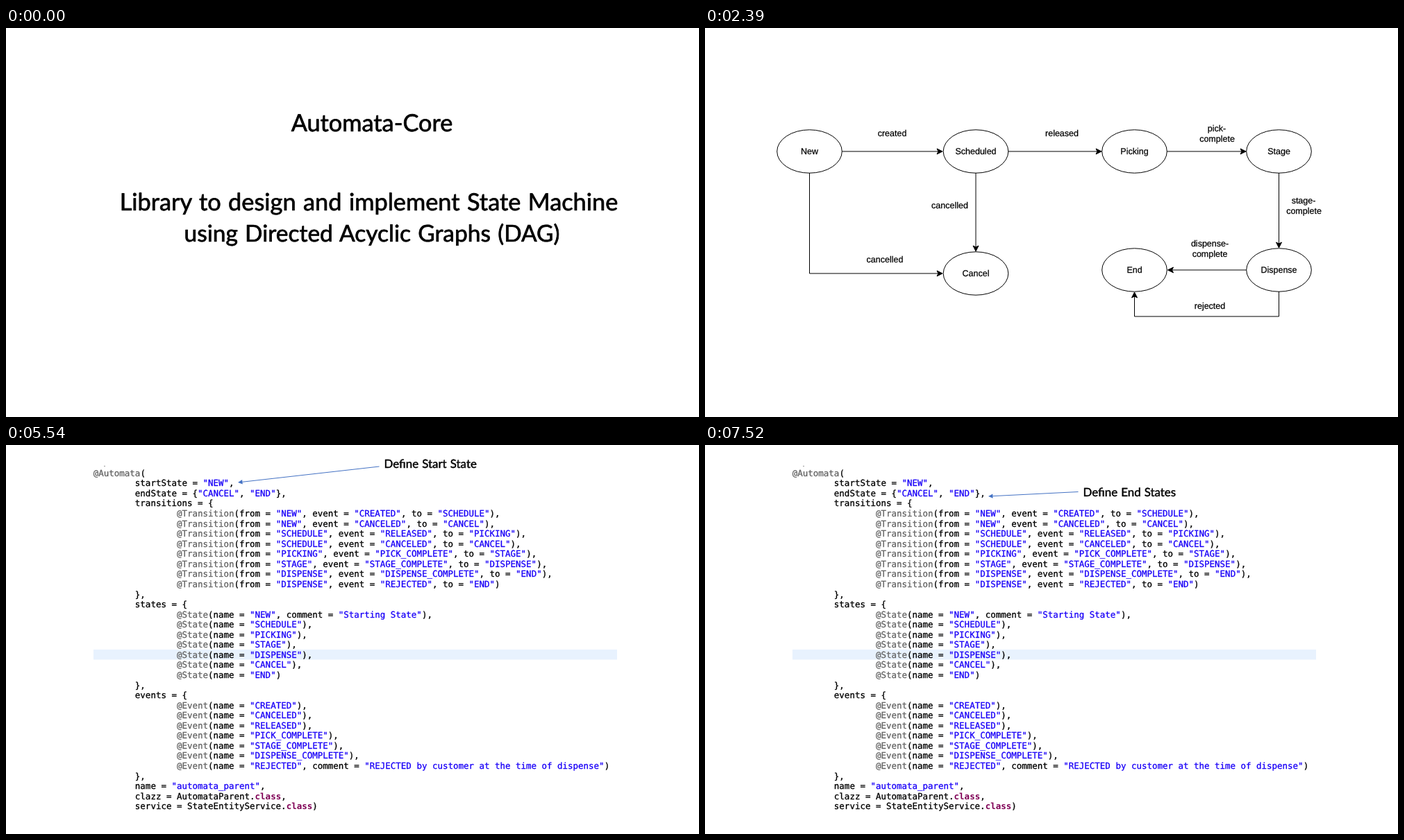
These frames come from a looping animation (998x561 px, 8 s). An HTML page with a canvas:

```html
<!DOCTYPE html>
<html lang="en">
<head>
<meta charset="utf-8">
<title>Automata-Core</title>
<style>
  html, body { margin: 0; width: 100%; height: 100%; overflow: hidden; background: #fff; }
  canvas { display: block; }
</style>
</head>
<body>
<canvas id="stage" width="998" height="561"></canvas>
<script>
const ctx = document.getElementById("stage").getContext("2d");
const LOOP = 8000;
const SLIDE = "Lato, sans-serif";
const MONO = '"DejaVu Sans Mono", monospace';

// Fractional glyph advances keep the spacing even at odd sizes.
ctx.textRendering = "geometricPrecision";
ctx.lineJoin = "round";

// "bolder" thickens the glyphs slightly, like smoothed screen type.
function text(str, x, y, font, { align = "left", color = "#000", gap = 0, bolder = 0 } = {}) {
  ctx.font = font;
  ctx.textAlign = align;
  ctx.fillStyle = ctx.strokeStyle = color;
  ctx.wordSpacing = gap + "px";
  ctx.fillText(str, x, y);
  if (bolder) {
    ctx.lineWidth = bolder;
    ctx.strokeText(str, x, y);
  }
}

function path(points, close = false) {
  ctx.beginPath();
  points.forEach(([x, y]) => ctx.lineTo(x, y));
  if (close) ctx.closePath();
}

// Polyline ending in a filled head; notch is the depth at which the line meets the head.
function arrow(points, { color = "#000", length = 8, half = 4, notch = 6, outline = true } = {}) {
  const [tip, from] = points.slice(-2).reverse();
  const angle = Math.atan2(tip[1] - from[1], tip[0] - from[0]);
  const c = Math.cos(angle), s = Math.sin(angle);
  const at = (back, side) => [tip[0] - back * c - side * s, tip[1] - back * s + side * c];
  ctx.strokeStyle = ctx.fillStyle = color;
  ctx.lineWidth = 1;
  path([...points.slice(0, -1), at(notch, 0)]);
  ctx.stroke();
  path([tip, at(length, half), at(notch, 0), at(length, -half)], true);
  ctx.fill();
  if (outline) ctx.stroke();
}

function drawTitle() {
  const style = { align: "center", gap: 1.7, bolder: 0.7 };
  text("Automata-Core", 527, 149, `34.3px ${SLIDE}`, style);
  text("Library to design and implement State Machine", 522.5, 262.5, `34.35px ${SLIDE}`, style);
  text("using Directed Acyclic Graphs (DAG)", 527, 308, `33.5px ${SLIDE}`, style);
}

const NODES = [
  ["New", 150.5, 178], ["Scheduled", 390, 178], ["Picking", 618.5, 178], ["Stage", 826.5, 178],
  ["Cancel", 390, 354], ["End", 618.5, 349], ["Dispense", 826.5, 349]
];
const EDGES = [
  [[197.5, 178], [342, 178]],
  [[437, 178], [571, 178]],
  [[665.5, 178], [779, 178]],
  [[390, 209], [390, 322]],
  [[150.5, 209], [150.5, 354], [342, 354]],
  [[826.5, 209], [826.5, 317]],
  [[779.5, 349], [666.5, 349]],
  [[826.5, 380], [826.5, 416], [618.5, 416], [618.5, 381]]
];
const EDGE_LABELS = [
  ["created", 269.5, 156], ["released", 514, 156], ["pick-", 737, 149], ["complete", 737.5, 164],
  ["cancelled", 352.5, 259.5], ["cancelled", 259, 337.5], ["stage-", 862, 252.5], ["complete", 862.5, 268],
  ["dispense-", 727, 314.5], ["complete", 727, 330], ["rejected", 727, 404.5]
];

function drawDiagram() {
  const font = '12.5px "Liberation Sans", Arial, sans-serif';
  const style = { align: "center", bolder: 0.25 };
  EDGES.forEach(points => arrow(points));
  for (const [, x, y] of NODES) {
    ctx.beginPath();
    ctx.ellipse(x, y, 46.8, 31.2, 0, 0, 2 * Math.PI);
    ctx.stroke();
  }
  NODES.forEach(([name, x, y]) => text(name, x, y + 4, font, style));
  EDGE_LABELS.forEach(([label, x, y]) => text(label, x, y, font, style));
}

const CODE = `@Automata(
        startState = "NEW",
        endState = {"CANCEL", "END"},
        transitions = {
                @Transition(from = "NEW", event = "CREATED", to = "SCHEDULE"),
                @Transition(from = "NEW", event = "CANCELED", to = "CANCEL"),
                @Transition(from = "SCHEDULE", event = "RELEASED", to = "PICKING"),
                @Transition(from = "SCHEDULE", event = "CANCELED", to = "CANCEL"),
                @Transition(from = "PICKING", event = "PICK_COMPLETE", to = "STAGE"),
                @Transition(from = "STAGE", event = "STAGE_COMPLETE", to = "DISPENSE"),
                @Transition(from = "DISPENSE", event = "DISPENSE_COMPLETE", to = "END"),
                @Transition(from = "DISPENSE", event = "REJECTED", to = "END")
        },
        states = {
                @State(name = "NEW", comment = "Starting State"),
                @State(name = "SCHEDULE"),
                @State(name = "PICKING"),
                @State(name = "STAGE"),
                @State(name = "DISPENSE"),
                @State(name = "CANCEL"),
                @State(name = "END")
        },
        events = {
                @Event(name = "CREATED"),
                @Event(name = "CANCELED"),
                @Event(name = "RELEASED"),
                @Event(name = "PICK_COMPLETE"),
                @Event(name = "STAGE_COMPLETE"),
                @Event(name = "DISPENSE_COMPLETE"),
                @Event(name = "REJECTED", comment = "REJECTED by customer at the time of dispense")
        },
        name = "automata_parent",
        clazz = AutomataParent.class,
        service = StateEntityService.class)`.split("\n");

function tokenStyle(token) {
  if (token[0] === '"') return { color: "#1a00f8", bolder: 0.3 };
  if (token[0] === "@") return { color: "#646464", bolder: 0.3 };
  return token === "class" ? { color: "#7f0055" } : { bolder: 0.3 };
}

function drawCode() {
  const size = 12.475, advance = size * 0.602;
  ctx.fillStyle = "#e8f2fe";
  ctx.fillRect(126, 295, 754, 14.5);
  ctx.fillStyle = "#999";
  ctx.fillRect(141, 30, 2, 1);
  CODE.forEach((line, row) => {
    let column = 0;
    for (const token of line.split(/("[^"]*"|@\w+|\bclass\b)/)) {
      const weight = token === "class" ? "bold " : "";
      text(token, 125.8 + column * advance, 44.8 + row * 14.56, `${weight}${size}px ${MONO}`,
        tokenStyle(token));
      column += token.length;
    }
  });
}

function drawCallout(label, baseline, from, to) {
  drawCode();
  arrow([from, to], { color: "#4472c4", length: 6.5, half: 3.2, notch: 6.5, outline: false });
  text(label, 544.5, baseline, `16.9px ${SLIDE}`, { gap: 0.8, bolder: 0.45 });
}

const SCENES = [
  [0, drawTitle],
  [500, drawDiagram],
  [3650, () => drawCallout("Define Start State", 33, [537.5, 31], [334, 54])],
  [6800, () => drawCallout("Define End States", 73.5, [537.5, 67.5], [408, 74])]
];

let shown = null;

function tick() {
  const time = performance.now() % LOOP;
  const scene = SCENES.findLast(([start]) => time >= start);
  if (scene !== shown) {
    shown = scene;
    ctx.fillStyle = "#fff";
    ctx.fillRect(0, 0, 998, 561);
    scene[1]();
  }
  requestAnimationFrame(tick);
}
tick();
</script>
</body>
</html>
```
